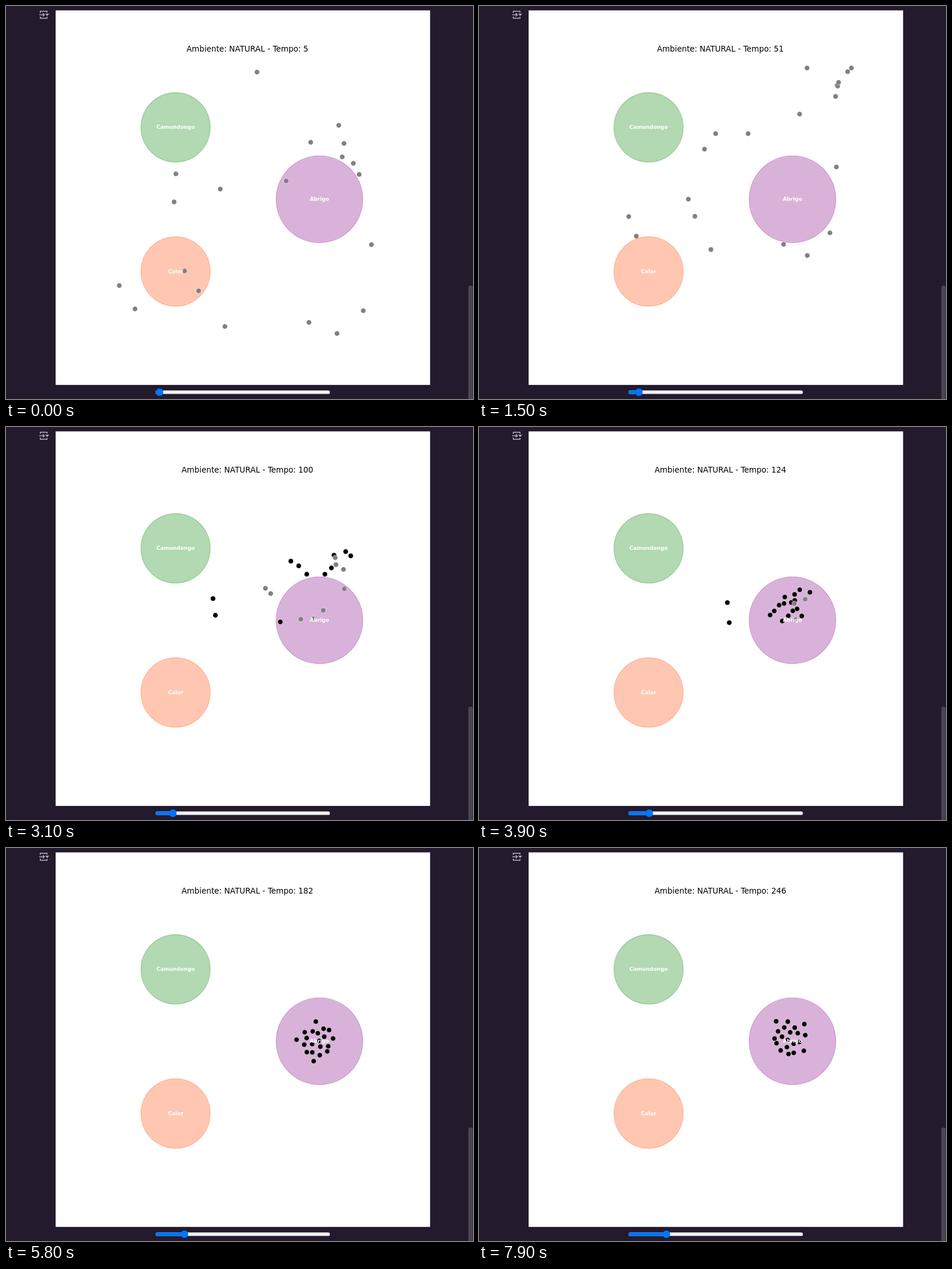
These frames come from a looping animation (800 by 672 pixels, 8 s). An HTML page with a canvas:

```html
<!DOCTYPE html>
<html lang="pt">
<head>
<meta charset="utf-8">
<title>Ambiente</title>
<style>
  html, body { margin: 0; width: 100%; height: 100%; overflow: hidden; background: #231a2d; }
  canvas { display: block; }
</style>
</head>
<body>
<canvas id="stage" width="800" height="672"></canvas>
<script>
const ctx = document.getElementById('stage').getContext('2d');
const STEP = 100, STEPS = 80;
const STRIDE = 8.9, MAX_TURN = 0.6, CAPTURE = 16;
const WALL = { top: 106, right: 638 };

const zones = [
  { name: 'Camundongo', x: 290.5, y: 207.5, r: 59.4, rgb: '0,128,0' },
  { name: 'Calor', x: 290.5, y: 454, r: 59.4, rgb: '255,69,0' },
  { name: 'Abrigo', x: 537, y: 330.5, r: 74.2, rgb: '128,0,128' }
];

// Where the walkers begin, in the order in which they turn black.
const starts = [
  [194, 478], [221, 518], [375, 548], [288, 335], [626, 408],
  [605, 288], [570, 204], [579, 235], [430, 113], [291, 287],
  [367, 313], [522, 233], [306, 453], [330, 487], [612, 521],
  [519, 541], [567, 560], [595, 269], [576, 258], [480, 299]
];

// Resting place inside the shelter: a slowly turning, breathing disc.
function nest(i, t) {
  const rank = (i * 7 + 8) % starts.length;
  const r = 33 * Math.sqrt((rank + 0.5) / starts.length) * (1 + 0.15 * Math.sin(t / 300 + i));
  const a = rank * 2.4 + t / 900;
  return [532 + r * Math.cos(a), 326 + 4 * Math.sin(t / 420) + r * Math.sin(a)];
}

// First heading: upwards, leaning to the upper right; steeper from further down.
function firstHeading(x, y) {
  const rise = (y - 100) ** 2 / 220 + 35;
  return Math.atan2(-rise, 700 - 0.3 * y - x);
}

// Walk straight on, then turn home: early near the top, later elsewhere.
function walk([x, y], i) {
  const path = [[x, y]];
  let heading = firstHeading(x, y), settled = false;
  for (let n = 1; n < STEPS; n++) {
    const t = n * STEP;
    const [gx, gy] = nest(i, t);
    const homeward = t > 2400 || (t > 1500 && y < 185);
    settled = settled || (homeward && Math.hypot(gx - x, gy - y) < CAPTURE);
    if (settled) {
      x += (gx - x) * 0.6;
      y += (gy - y) * 0.6;
    } else {
      if (homeward) {
        const off = Math.atan2(gy - y, gx - x) - heading;
        const turn = Math.atan2(Math.sin(off), Math.cos(off));
        heading += Math.max(-MAX_TURN, Math.min(MAX_TURN, turn));
      }
      x = Math.min(WALL.right, x + STRIDE * Math.cos(heading));
      y = Math.max(WALL.top, y + STRIDE * Math.sin(heading));
    }
    path.push([x, y]);
  }
  return path;
}

const paths = starts.map(walk);

function disc(x, y, r, fill, stroke, width) {
  ctx.beginPath();
  ctx.arc(x, y, r, 0, Math.PI * 2);
  ctx.fillStyle = fill;
  ctx.fill();
  if (stroke) {
    ctx.strokeStyle = stroke;
    ctx.lineWidth = width;
    ctx.stroke();
  }
}

function bar(x, y, w, h, fill) {
  ctx.beginPath();
  ctx.roundRect(x, y, w, h, Math.min(w, h) / 2);
  ctx.fillStyle = fill;
  ctx.fill();
}

function line(...points) {
  ctx.beginPath();
  for (const [x, y] of points) ctx.lineTo(x, y);
  ctx.stroke();
}

function label(text, x, y, font, fill) {
  ctx.font = font + ' "DejaVu Sans", sans-serif';
  ctx.textAlign = 'center';
  ctx.fillStyle = fill;
  ctx.fillText(text, x, y);
}

function outputIcon() {
  ctx.strokeStyle = ctx.fillStyle = '#b8b3bc';
  ctx.lineWidth = 1.4;
  for (const side of [-1, 1]) {
    const y = 15 + side * 6;
    line([58.7, y - side * 3], [58.7, y], [70.3, y], [70.3, y - side * 2.5]);
  }
  line([57, 15], [65.5, 15]);
  line([63, 12.2], [65.8, 15], [63, 17.8]);
  ctx.beginPath();
  ctx.moveTo(67, 13.2);
  ctx.lineTo(74, 13.2);
  ctx.lineTo(70.5, 17);
  ctx.fill();
}

function slider(tempo) {
  const x = 261.8 + 0.2407 * tempo;
  bar(256, 657.2, 299, 6.4, '#b2b2b2');
  bar(256.6, 657.8, 297.8, 5.2, '#efefef');
  bar(256, 657.2, x - 256, 6.4, '#0075ff');
  disc(x, 660.4, 6.4, '#0075ff');
}

function draw(step) {
  const tempo = Math.ceil(5 + 3.042 * step);

  ctx.fillStyle = '#231a2d';
  ctx.fillRect(0, 0, 800, 672);
  ctx.fillStyle = '#fff';
  ctx.fillRect(85, 7.5, 641.5, 640.4);
  outputIcon();
  bar(792, 478, 7.5, 210, '#4c4455');

  for (const z of zones) {
    const tint = `rgba(${z.rgb},0.3)`;
    disc(z.x, z.y, z.r, tint, tint, 1.1);
  }
  paths.forEach((path, i) => {
    const [x, y] = path[step];
    const calm = step * STEP >= 1650 + 140 * i;
    disc(x, y, 4.3, calm ? '#000' : '#808080', '#fff', 0.5);
  });
  for (const z of zones) label(z.name, z.x, z.y + 2.6, 'bold 8.9px', '#fff');
  label('Ambiente: NATURAL - Tempo: ' + tempo, 413.5, 77.6, '13.35px', '#000');
  slider(tempo);
}

function tick(now) {
  draw(Math.floor(now / STEP) % STEPS);
  requestAnimationFrame(tick);
}

draw(0);
requestAnimationFrame(tick);
</script>
</body>
</html>
```
